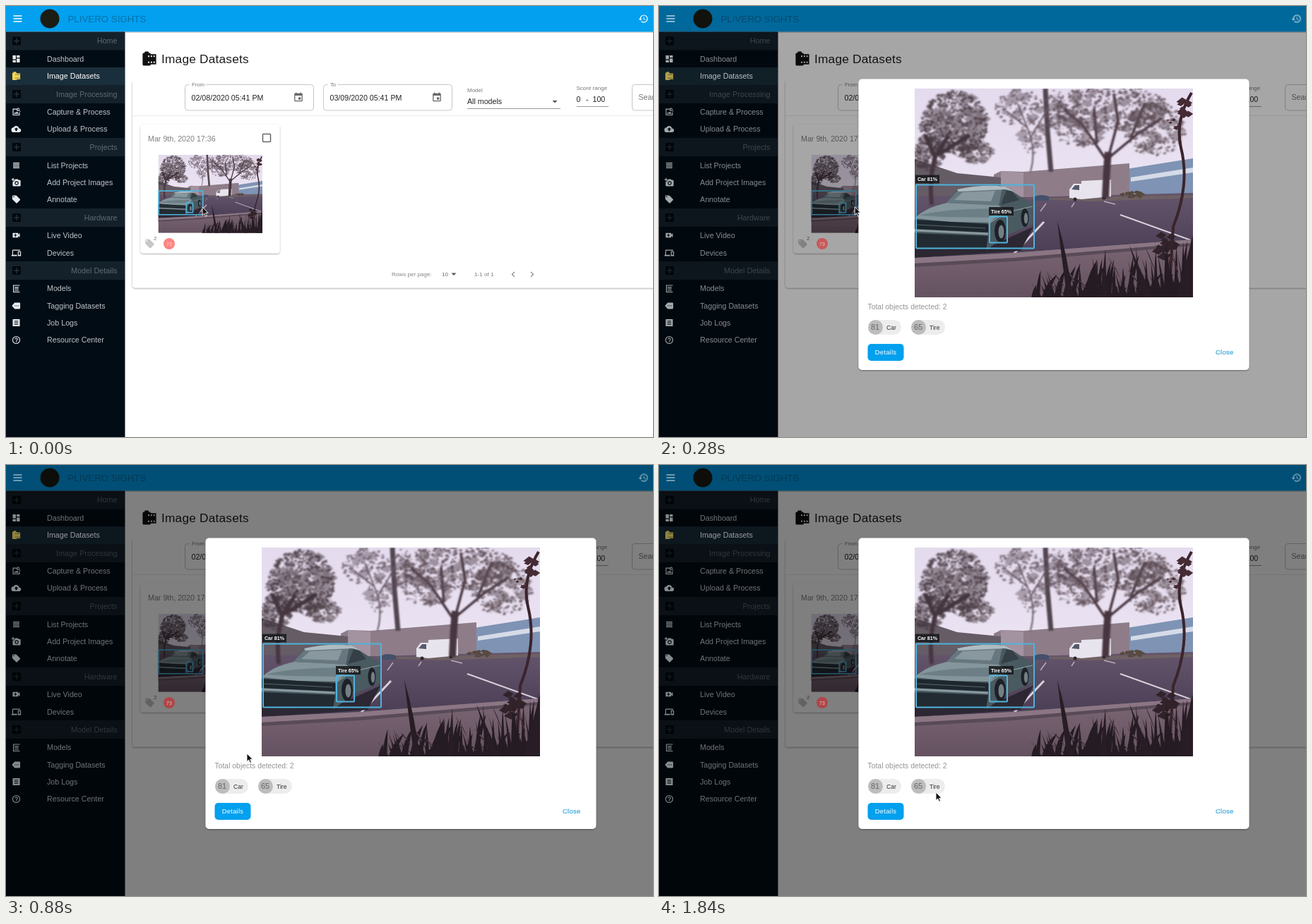
Animation of 916x611 px, one loop 2.08 s. Source, as an HTML page:

```html
<!DOCTYPE html>
<html lang="en">
<head>
<meta charset="utf-8">
<title>Image Datasets</title>
<style>
html, body { margin: 0; width: 100%; height: 100%; overflow: hidden; background: #fff; }
svg { display: block; width: 100%; height: 100%; }
text { font-family: "Liberation Sans", Arial, sans-serif; white-space: pre; }
</style>
</head>
<body>
<svg id="stage" viewBox="0 0 916 611" xmlns="http://www.w3.org/2000/svg"></svg>
<script>
const LOOP = 2080, STEP = 40;
const stage = document.getElementById('stage');

// Drawing helpers
const rect = (x, y, w, h, fill, more = '') =>
  `<rect x="${x}" y="${y}" width="${w}" height="${h}" fill="${fill}" ${more}/>`;
const box = (x, y, w, h, stroke, more = '') =>
  rect(x, y, w, h, 'none', `stroke="${stroke}" ${more}`);
const path = (d, fill, more = '') => `<path d="${d}" fill="${fill}" ${more}/>`;
const line = (d, stroke, width, more = '') =>
  path(d, 'none', `stroke="${stroke}" stroke-width="${width}" ${more}`);
const circle = (x, y, r, fill, more = '') =>
  `<circle cx="${x}" cy="${y}" r="${r}" fill="${fill}" ${more}/>`;
const oval = (x, y, rx, ry, fill) =>
  `<ellipse cx="${x}" cy="${y}" rx="${rx}" ry="${ry}" fill="${fill}"/>`;
const text = (x, y, str, size = 10.67, fill = '#222', more = '') =>
  `<text x="${x}" y="${y}" font-size="${size}" fill="${fill}" ${more}>${str}</text>`;
const MID = 'text-anchor="middle"', END = 'text-anchor="end"';

// Icons on a 24 unit grid
const ICONS = {
  board: 'M3 13h8V3H3zM3 21h8v-6H3zM13 21h8V11h-8zM13 3v6h8V3z',
  roll: 'M14 5a2 2 0 0 0-2-2h-1V2a1 1 0 0 0-1-1H6a1 1 0 0 0-1 1v1H4a2 2 0 0 0-2 2v15a2 2 0 0 0 2 2h8a2 2 0 0 0 2-2h8V5zM10 7h2v2h-2zM14 7h2v2h-2zM18 7h2v2h-2zM10 16h2v2h-2zM14 16h2v2h-2zM18 16h2v2h-2z',
  capture: 'M3 4h9v2H5v13h14v-6h2v8H3zM6 17l3-4 2 2 3-4 4 6zM17 2a4 4 0 1 0 2 7l3 3 1-1-3-3a4 4 0 0 0-3-6zM17 4a2 2 0 1 1 0 4 2 2 0 0 1 0-4z',
  cloud: 'M19 10A7.5 7.5 0 0 0 5 8a6 6 0 0 0 1 12h13a5 5 0 0 0 0-10zM14 13v4h-4v-4H7l5-5 5 5z',
  lines: 'M4 5h16v2H4zM4 9h16v2H4zM4 13h16v2H4zM4 17h16v2H4z',
  photo: 'M3 1h2v3h3v2H5v3H3V6H0V4h3zM6 10V7h3V4h7l2 2h3a2 2 0 0 1 2 2v12a2 2 0 0 1-2 2H5a2 2 0 0 1-2-2V10zM13 9a5 5 0 1 0 0 10 5 5 0 0 0 0-10zM13 11a3 3 0 1 1 0 6 3 3 0 0 1 0-6z',
  tag: 'M21.4 11.6l-9-9A2 2 0 0 0 11 2H4a2 2 0 0 0-2 2v7a2 2 0 0 0 .6 1.4l9 9a2 2 0 0 0 2.8 0l7-7a2 2 0 0 0 0-2.8zM5.5 4a1.5 1.5 0 1 1 0 3 1.5 1.5 0 0 1 0-3z',
  video: 'M17 10.5V7a1 1 0 0 0-1-1H4a1 1 0 0 0-1 1v10a1 1 0 0 0 1 1h12a1 1 0 0 0 1-1v-3.5l4 4v-11zM14 13h-3v3H9v-3H6v-2h3V8h2v3h3z',
  devices: 'M4 6h18V4H4a2 2 0 0 0-2 2v11H0v3h14v-3H4zM17 8a1 1 0 0 0-1 1v10a1 1 0 0 0 1 1h6a1 1 0 0 0 1-1V9a1 1 0 0 0-1-1zM18 10h4v7h-4z',
  models: 'M4 3h17v2H4zM4 5h2v15H4zM8 8h10v2H8zM8 12h10v2H8zM8 16h10v2H8zM4 20h17v2H4z',
  label: 'M20 4H8L1 12l7 8h12a2 2 0 0 0 2-2V6a2 2 0 0 0-2-2zM8 11h2v2H8zM12 11h2v2h-2zM16 11h2v2h-2z',
  log: 'M3 3h18v18H3zM7 7h10v2H7zM7 11h10v2H7zM7 15h10v2H7z',
  help: 'M12 2a10 10 0 1 0 0 20 10 10 0 0 0 0-20zM12 4a8 8 0 1 1 0 16 8 8 0 0 1 0-16zM11 16h2v2h-2zM12 6a4 4 0 0 0-4 4h2a2 2 0 1 1 4 0c0 2-3 2-3 5h2c0-2 3-2.5 3-5a4 4 0 0 0-4-4z',
  history: 'M13 3a9 9 0 0 0-9 9H1l4 4 4-4H6a7 7 0 1 1 2 4.9l-1.4 1.5A9 9 0 1 0 13 3zM12 8v5l4.3 2.5.7-1.2-3.5-2V8z',
  date: 'M6 1h2v2h8V1h2v2h1a2 2 0 0 1 2 2v14a2 2 0 0 1-2 2H5a2 2 0 0 1-2-2V5a2 2 0 0 1 2-2h1zM5 8h14v11H5zM12 12h5v5h-5z'
};
const icon = (name, cx, cy, size, fill) => path(ICONS[name], fill,
  `fill-rule="evenodd" transform="translate(${cx - size / 2} ${cy - size / 2}) scale(${size / 24})"`);

// Seeded noise for foliage
let seed = 11;
const rnd = () => (seed = (seed * 16807) % 2147483647) / 2147483647;
const at = (x, y) => `${x.toFixed(1)} ${y.toFixed(1)}`;

function leaves(cx, cy, rx, ry, count, size) {
  let d = '';
  for (let i = 0; i < count; i++) {
    const a = rnd() * 6.283, r = Math.sqrt(rnd()), s = size * (.4 + rnd());
    d += `M${at(cx + Math.cos(a) * r * rx - s, cy + Math.sin(a) * r * ry)}` +
      `l${at(s, -s * .8)} ${at(s, s * .6)} ${at(-s * .9, s * .7)}z`;
  }
  return d;
}

// Soft mass below, fine leaves above
const foliage = (cx, cy, rx, ry, density, fill) => {
  const n = Math.round(rx * ry * density);
  return path(leaves(cx, cy, rx * .9, ry * .9, n / 7, 8), fill, 'opacity=".5"') +
    path(leaves(cx, cy, rx, ry, n, 2.3), fill, 'opacity=".85"');
};

function blades(count) {
  let d = '';
  for (let i = 0; i < count; i++) {
    const u = i / count, x = 165 + 232 * Math.pow(u, .8);
    const h = 16 + rnd() * (24 + u * 58), lean = (rnd() - .5) * 46;
    d += `M${at(x, 298)}Q${at(x + lean * .2, 296 - h * .6)} ${at(x + lean, 296 - h)}` +
      `Q${at(x + lean * .4 + 4, 298 - h * .5)} ${at(x + 6, 298)}z`;
  }
  return d;
}

const wheel = (x, y, rx, ry) => oval(x, y, rx, ry, '#1d2127') + oval(x + 1.5, y + 1, rx * .5, ry * .6, '#747f85');

const car = () =>
  path('M0 227V184Q14 170 44 163L60 143Q95 135 128 139L151 154 167 163V192L130 208 103 228z', '#4a5a61') +
  path('M0 184Q16 168 46 162L118 165 128 172 106 190 50 189z', '#84959b') +
  path('M6 180Q40 170 122 170L106 183 40 182z', '#6d7f86') +
  path('M45 162L61 144 124 141 119 166z', '#67777f') +
  path('M56 158L68 147 114 145 108 160z', '#89979f') +
  path('M122 165L130 144 138 146 148 158z', '#353f46') +
  path('M60 143Q95 135 128 139L140 146 128 143 62 146z', '#aebbc0') +
  line('M104 192L128 176 167 167', '#8b9ca2', 1.2) +
  path('M0 186L104 192V204L0 199z', '#1d272d') + line('M2 193L100 198', '#56666e', 1) +
  line('M0 201L104 206', '#8b9aa1', 3) +
  path('M0 205L104 209 101 229 0 227z', '#232b32') +
  wheel(121, 202, 8, 16) + wheel(156, 183, 5.5, 13);

function photo() {
  const bark = '#46363f';
  return rect(0, 0, 394, 296, 'url(#sky)') +
    path('M300 114L394 99V152H300z', '#7f93b4') +
    path('M306 126L394 112V119L306 132z', '#d6dbe8') +
    path('M112 122L122 117 154 118 304 106V156H112z', '#8e7d89') +
    path('M122 117L154 119V154H122z', '#a392a0') +
    path('M0 100L60 120 122 126V160H0z', '#655c66') +
    path('M0 152L160 154 394 148V250H0z', 'url(#road)') +
    path('M150 156L394 151V155L250 160z', '#6f6163') +
    path('M170 153q8 -4 20 0v6h-20z', '#45506a') +
    path('M219 155V143l6 -8h11v-4l42 -2v24l-42 4z', '#e8e4ee') +
    path('M222 143l5 -6h6v7z', '#555b6b') +
    circle(227, 157, 2.5, '#292630') + circle(268, 155, 2.5, '#292630') +
    `<g filter="url(#soft)">` +
    line('M24 165Q20 120 30 95L52 60M29 98L15 66M33 94L78 66', bark, 6) +
    foliage(56, 50, 48, 47, .3, '#43363e') + foliage(20, 92, 22, 26, .25, '#43363e') +
    foliage(88, 90, 24, 17, .25, '#4a3c43') + path(leaves(54, 40, 40, 30, 70, 3), '#7b6c76') +
    line('M185 0L188 60 193 118', '#51454f', 7) +
    line('M164 118Q172 90 162 62L146 22M164 70L190 26M160 56L130 32', '#685863', 2) +
    foliage(148, 27, 34, 26, .15, '#675763') + foliage(168, 68, 18, 26, .12, '#6c5c68') +
    foliage(200, 30, 16, 28, .18, '#62525d') +
    line('M270 155Q272 110 274 90', bark, 10) +
    line('M273 104L238 52 212 30M274 98L288 46 282 8M275 98L316 64 350 42M258 78L254 28M306 70L326 20', bark, 3.5) +
    foliage(278, 28, 82, 32, .17, '#57464f') + foliage(340, 58, 44, 38, .17, '#5b4a52') +
    foliage(234, 58, 38, 26, .15, '#5d4d56') + `</g>` +
    path(leaves(308, 151, 18, 4, 36, 3), '#57493f') +
    line('M183 189L137 238', '#d8d0da', 3) + line('M291 179L394 216', '#d8d0da', 2) +
    line('M186 163L178 174M226 162L222 168M268 160L284 164', '#b9adb9', 1.5) +
    path('M0 222L110 222 168 196 150 230 0 240z', '#2c2733') +
    car() +
    path('M0 240L140 233 394 214V296H0z', 'url(#walk)') +
    path('M0 240L140 233 394 214V219L140 240 0 248z', '#8b7684') +
    path('M0 248L140 240 394 219V223L140 245 0 253z', '#594a57') +
    line('M392 6Q368 46 377 84Q390 136 366 196L360 296', '#3b242c', 4) +
    path(leaves(384, 26, 8, 18, 14, 6), '#452b33') +
    path(leaves(364, 50, 10, 11, 8, 4), '#452b33') +
    path(leaves(356, 224, 13, 18, 20, 7), '#32232a') +
    path(blades(95), '#251b23') +
    path('M216 298Q208 240 202 188Q217 240 224 298zM262 298L270 228 272 298zM326 298L304 222 338 298zM370 298L394 208V298z', '#281d25');
}

const detections = (weight) => {
  const more = `stroke-width="${weight}" vector-effect="non-scaling-stroke" rx="1"`;
  return box(2, 136.5, 167, 90, '#4fb3dc', more) + box(106, 181.5, 25, 37, '#4fb3dc', more);
};

// Navigation: [title, y centre] or [title, y centre, icon]
const NAV = [
  ['Home', 49.5], ['Dashboard', 75, 'board'], ['Image Datasets', 99.5, 'roll'],
  ['Image Processing', 125], ['Capture &amp; Process', 150, 'capture'], ['Upload &amp; Process', 174.5, 'cloud'],
  ['Projects', 200], ['List Projects', 226, 'lines'], ['Add Project Images', 250, 'photo'], ['Annotate', 274, 'tag'],
  ['Hardware', 300], ['Live Video', 325, 'video'], ['Devices', 350, 'devices'],
  ['Model Details', 375], ['Models', 400.5, 'models'], ['Tagging Datasets', 425, 'label'],
  ['Job Logs', 449, 'log'], ['Resource Center', 473.5, 'help']
];
const groupRow = ([title, y]) => rect(0, y - 13, 168, 26, '#14212b') +
  rect(9, y - 6, 12, 12, '#03080d', 'rx="1"') +
  line(`M15 ${y - 4}v8M11 ${y}h8`, '#24323b', 1.5) +
  text(157.5, y + 3.5, title, 10.8, '#5d6a72', END);
const itemRow = ([title, y, name]) => {
  const active = name === 'roll';
  return icon(name, 14.5, y, 13.4, active ? '#f2d558' : '#e9edef') +
    text(58, y + 3.5, title, 10.7, active ? '#fff' : '#bfc5c9');
};

const field = (x, label, value, w) => box(x, 111.5, 182, 36.5, '#c6c6c6', 'rx="4"') +
  rect(x + 6, 109, w, 5, '#fff') + text(x + 9.5, 114, label, 7.7, '#777') +
  text(x + 9, 134, value) + icon('date', x + 160.5, 129.5, 15.5, '#666');
const caret = (x, y) => path(`M${x - 3.5} ${y - 1.5}h7l-3.5 3.5z`, '#555');

const page = () => rect(0, 0, 916, 611, '#fff') +
  rect(179, 105, 760, 294.5, '#fff', 'rx="4" filter="url(#lift)"') +
  rect(179, 104, 737, 51, '#fff') + line('M179 155.5H916', '#ebebeb', 1) +
  icon('roll', 203, 75, 23, '#111') +
  text(220, 81, 'Image Datasets', 17.3, '#1c1c1c', 'letter-spacing=".2"') +
  field(253.5, 'From', '02/08/2020 05:41 PM', 23) + field(449.5, 'To', '03/09/2020 05:41 PM', 14) +
  text(653, 122, 'Model', 8, '#777') + text(653, 139, 'All models') +
  line('M653 145.5H785', '#999', 1) + caret(777, 135.5) +
  text(807.5, 119, 'Score range', 8, '#777') +
  text(807.5, 136, '0') + text(821, 136, '-') + text(830.5, 136, '100') +
  line('M808 142.5H853', '#999', 1) +
  box(886.5, 111.5, 60, 36.5, '#c6c6c6', 'rx="4"') + text(895.5, 133, 'Search', 10.67, '#777') +
  rect(190.5, 168, 197, 182.5, '#fff', 'rx="4" filter="url(#lift)"') +
  text(201, 192, 'Mar 9th, 2020 17:36', 10.7, '#808080') +
  box(363.5, 181.5, 11, 11, '#666', 'stroke-width="1.5" rx="1"') +
  `<g transform="translate(215.5 211) scale(.3744)"><use href="#photo"/>${detections(1.6)}</g>` +
  icon('tag', 203.5, 337, 15, '#c6c6c6') + text(209, 332, '2', 8, '#777') +
  text(546, 383, 'Rows per page:', 8.1, '#858585') + text(617, 383, '10', 8.1, '#666') + caret(634, 380) +
  text(663, 383, '1-1 of 1', 8.1, '#777') +
  line('M720 377l-3.5 3.5 3.5 3.5M743 377l3.5 3.5 -3.5 3.5', '#888', 1.2);

const chrome = () => rect(0, 36, 916, 2, '#000', 'opacity=".18"') +
  rect(0, 0, 916, 36.5, '#02a0ee') + text(87.5, 22.5, 'PLIVERO SIGHTS', 13.3, '#0a6fa8') +
  circle(62, 18, 13.5, '#1b1c14') +
  rect(0, 37, 168.5, 574, '#020c15') + rect(0, 87, 168, 25, '#1a2f3c') +
  NAV.filter(n => !n[2]).map(groupRow).join('');

const lit = () => line('M10.5 14h12M10.5 18h12M10.5 22h12', '#fff', 1.6) +
  icon('history', 902.5, 18, 15, '#fff') + NAV.filter(n => n[2]).map(itemRow).join('');

const score = (x, w, value, label) => rect(x, 445, w, 21, '#ededed', 'rx="10.5"') +
  circle(x + 10.5, 455.5, 10.5, '#bdbdbd') + text(x + 10, 459.3, value, 11, '#666', MID) +
  text(x + 26, 459, label, 8.6, '#333');
const badge = (x, y, w, label) => rect(x, y, w, 12, '#16181b', 'opacity=".85"') +
  text(x + 3, y + 8.5, label, 7.1, '#fff', 'font-weight="bold"');

const dialog = () => rect(282.5, 103.5, 553, 412.5, '#fff', 'rx="5" filter="url(#lift)"') +
  `<g transform="translate(362 117)"><use href="#photo"/>${detections(2)}</g>` +
  badge(363, 239.5, 34, 'Car 81%') + badge(467, 285, 35, 'Tire 65%') +
  text(295.5, 430, 'Total objects detected: 2', 10.4, '#959595') +
  score(296, 47, '81', 'Car') + score(357, 48, '65', 'Tire') +
  rect(295.5, 479, 51, 24, '#02a0ee', 'rx="5"') +
  text(321, 494.3, 'Details', 9.4, '#fff', MID + ' letter-spacing=".25"') +
  text(788, 494.3, 'Close', 9.4, '#3ba7da', 'letter-spacing=".3" stroke="#3ba7da" stroke-width=".2"');

const fade = (id, top, bottom) => `<linearGradient id="${id}" x2="0" y2="1">
  <stop stop-color="${top}"/><stop offset="1" stop-color="${bottom}"/></linearGradient>`;

stage.innerHTML = `<defs>${fade('sky', '#e4dbee', '#f3edf7')}${fade('road', '#64556c', '#463a51')}
  ${fade('walk', '#7b6674', '#655260')}
  <filter id="lift" x="-5%" y="-5%" width="110%" height="110%">
    <feDropShadow dx="0" dy="1" stdDeviation="1" flood-opacity=".38"/></filter>
  <filter id="soft"><feGaussianBlur stdDeviation=".8"/></filter>
  <clipPath id="crop"><rect width="394" height="296"/></clipPath>
  <g id="photo" clip-path="url(#crop)">${photo()}</g></defs>
  ${page()}${chrome()}
  <rect id="shade" width="916" height="611"/>
  <g id="lit">${lit()}</g>
  <circle id="dot" cx="231" cy="337" r="8"/>
  ${text(231, 339.5, '73', 7, '#fff', MID + ' opacity=".7"')}
  <g id="dialog">${dialog()}</g>
  <path id="cursor" d="M0 0V11.5L2.7 9 4.6 13.2 6.5 12.4 4.7 8.3H8.2Z" fill="#111" stroke="#fff" stroke-width=".9"/>`;

const [shade, glow, dot, modal, cursor] =
  ['shade', 'lit', 'dot', 'dialog', 'cursor'].map(id => document.getElementById(id));

// Keys are [time, ...values]
const SHADE = [[200, 0], [240, .1], [280, .35], [320, .44], [400, .49], [480, .5]];
const DIALOG = [[120, 0], [160, .35], [200, .7], [240, .9], [280, 1]];
const CURSOR = [[0, 278, 285], [480, 276.5, 284.5], [680, 276.5, 284.5], [760, 300, 326],
  [880, 341, 409], [1000, 337, 443], [1120, 331, 454], [1280, 331, 454], [1400, 341, 456],
  [1600, 378, 461], [1800, 392, 464]];

function sample(keys, t) {
  const i = keys.findIndex(k => k[0] > t);
  if (i === 0) return keys[0].slice(1);
  if (i < 0) return keys[keys.length - 1].slice(1);
  const a = keys[i - 1], b = keys[i], u = (t - a[0]) / (b[0] - a[0]);
  return a.slice(1).map((v, n) => v + (b[n + 1] - v) * u);
}

function draw(ms) {
  const t = Math.floor(ms % LOOP / STEP) * STEP;
  const [dark] = sample(SHADE, t), k = dark * 2;
  shade.setAttribute('opacity', dark);
  glow.setAttribute('opacity', 1 - .42 * k);
  dot.setAttribute('fill', `rgb(${255 - 80 * k},${132 - 62 * k},${130 - 58 * k})`);
  modal.setAttribute('opacity', sample(DIALOG, t)[0]);
  cursor.setAttribute('transform', `translate(${sample(CURSOR, t).join(' ')})`);
}

const start = performance.now();
(function tick() {
  draw(performance.now() - start);
  requestAnimationFrame(tick);
})();
</script>
</body>
</html>
```
